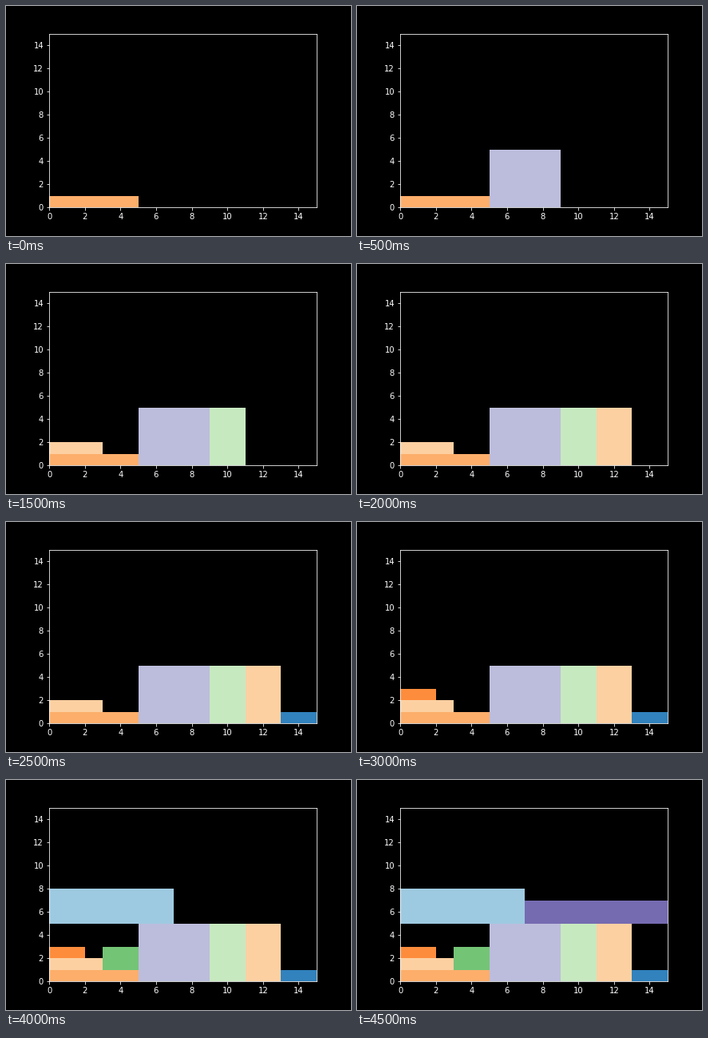
Animation of 432x288 px, one loop 5 s. Source, as a matplotlib script:

```python
import matplotlib.pyplot as plt
import numpy as np
from matplotlib.animation import FuncAnimation
from matplotlib.patches import Rectangle

plt.style.use("dark_background")
plt.rcParams.update({"font.family": "DejaVu Sans", "font.size": 10})

SIZE = 15
STEP_MS = 500

# Blocks narrow down to width 2, then two wide ones cover the stack.
WIDTHS = [max(2, 5 - i) for i in range(8)] + [7, 8]
HEIGHTS = [1, 5, 1, 5, 5, 1, 1, 2, 3, 2]
COURSES = [0, 0, 1, 0, 0, 0, 2, 1, 3, 3]
SHADES = [6, 14, 7, 11, 7, 0, 5, 9, 2, 12]


def stack():
    """Fill each course from the left; every block drops onto what is below."""
    skyline = np.zeros(SIZE, int)
    filled = np.zeros(max(COURSES) + 1, int)
    for w, h, course in zip(WIDTHS, HEIGHTS, COURSES):
        x = filled[course]
        y = skyline[x:x + w].max()
        skyline[x:x + w] = y + h
        filled[course] += w
        yield (x, y), w, h


fig, ax = plt.subplots(figsize=(6, 4), dpi=72)
fig.subplots_adjust(left=0.125, right=0.9, bottom=0.125, top=0.88)
ax.set(xlim=(0, SIZE), ylim=(0, SIZE),
       xticks=range(0, SIZE, 2), yticks=range(0, SIZE, 2))

palette = plt.get_cmap("tab20c")
blocks = [
    ax.add_patch(Rectangle(*place, facecolor=palette(shade), edgecolor="none"))
    for place, shade in zip(stack(), SHADES)
]


def show(frame):
    for i, block in enumerate(blocks):
        block.set_visible(i <= frame)
    return blocks


def init():
    return show(0)


anim = FuncAnimation(fig, show, frames=len(blocks), init_func=init,
                     interval=STEP_MS, repeat=True, repeat_delay=0)
plt.show()
```
